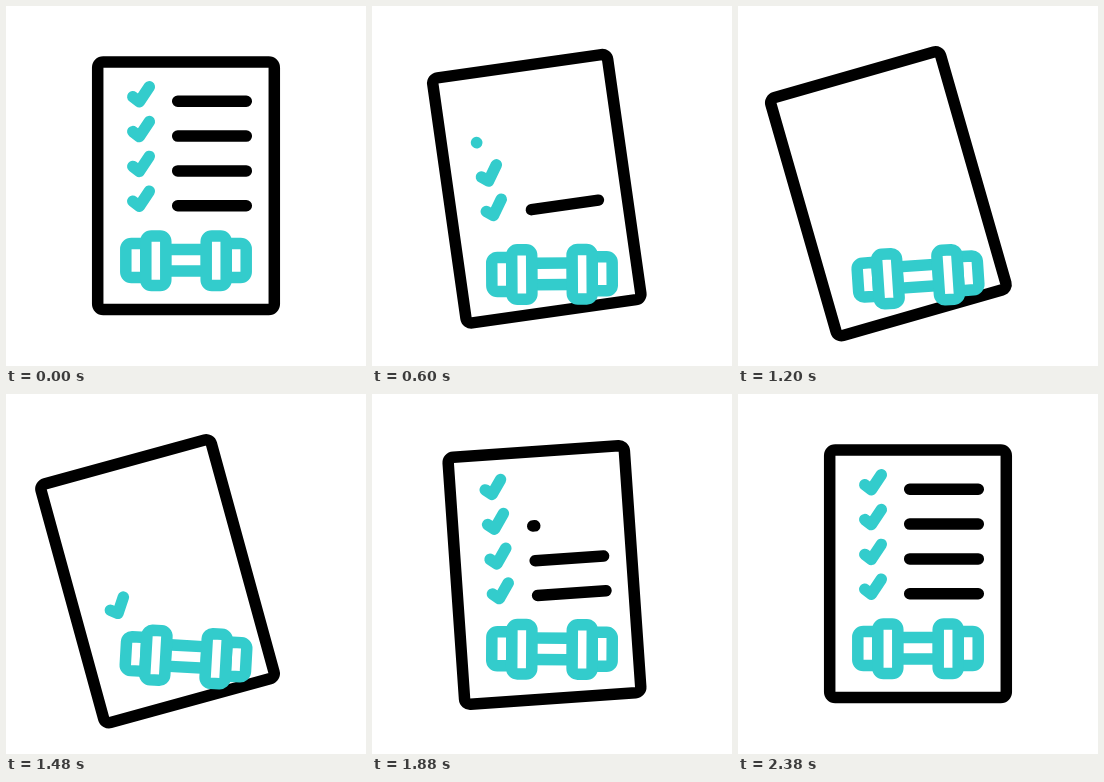
An HTML page for the animation above (2400 ms loop, 360 px wide and 360 px high).

```html
<!DOCTYPE html>
<html lang="en">
<head>
<meta charset="utf-8">
<title>Workout checklist</title>
<style>
  html, body { margin: 0; width: 100%; height: 100%; overflow: hidden; background: #fff; }
  svg { display: block; width: 100%; height: 100%; }
  g { fill: #fff; stroke-width: 11.5; stroke-linecap: round; stroke-linejoin: round; }
  #paper { stroke: #000; }
  #paper path { fill: none; }
  .check, #dumbbell { stroke: #3cc; }
</style>
</head>
<body>
<svg viewBox="0 0 360 360">
  <g id="paper"><rect x="91.7" y="56" width="176.6" height="247.5" rx="5.5"/></g>
  <g id="dumbbell">
    <rect x="119.8" y="237.5" width="20" height="34" rx="5.5"/>
    <rect x="220.2" y="237.5" width="20" height="34" rx="5.5"/>
    <rect x="159.5" y="243.5" width="41" height="21.5"/>
    <rect x="139.8" y="230" width="20" height="49.5" rx="5.5"/>
    <rect x="200.2" y="230" width="20" height="49.5" rx="5.5"/>
  </g>
</svg>
<script>
const LOOP = 2400, STEP = 400 / 3;
const paper = document.getElementById('paper');
const dumbbell = document.getElementById('dumbbell');

// cubic-bezier(.8, 0, .2, 1)
function ease(x) {
  if (x <= 0) return 0;
  if (x >= 1) return 1;
  let lo = 0, hi = 1;
  for (let i = 0; i < 24; i++) {
    const s = (lo + hi) / 2, r = 1 - s;
    if (2.4 * r * r * s + 0.6 * r * s * s + s ** 3 < x) lo = s; else hi = s;
  }
  return lo * lo * (3 - 2 * lo);
}

// Marks are erased top to bottom, then drawn again bottom to top
const marks = [];
function addMark(d, className, eraseAt, drawAt) {
  const path = document.createElementNS('http://www.w3.org/2000/svg', 'path');
  path.setAttribute('d', d);
  path.setAttribute('class', className);
  path.setAttribute('pathLength', 1);
  paper.append(path);
  marks.push({ path, eraseAt, drawAt });
}
for (let row = 0; row < 4; row++) {
  const y = 95.3 + row * 34.8, out = row * STEP, back = (3 - row) * STEP;
  addMark(`M171.7 ${y}H240.3`, 'line', 182 + out, 1587 + back);
  addMark(`M126.8 ${y - 4.5}l6.5 5 10-15`, 'check', 353 + out, 1377 + back);
}

// Dumbbell bounce: one [drop, angle] pose every 400 ms
const poses = [[0, 0], [29.5, -17], [-1.5, 15.5], [16, -3.8], [7.6, 3.8], [0, 0], [0, 0]];

function draw(t) {
  const tilt = 16 * (ease(t / 1200) - ease(t / 1200 - 1));
  paper.setAttribute('transform', `rotate(${-tilt} 193.6 289)`);

  for (const { path, eraseAt, drawAt } of marks) {
    const shown = 1 - ease((t - eraseAt) / STEP) + ease((t - drawAt) / STEP);
    path.style.display = shown > 0.002 ? '' : 'none';
    path.setAttribute('stroke-dasharray', shown < 1 ? `${shown} 2` : 'none');
  }

  const i = Math.floor(t / 400), k = ease(t / 400 - i);
  const [drop, angle] = poses[i].map((v, j) => v + (poses[i + 1][j] - v) * k);
  dumbbell.setAttribute('transform', `translate(0 ${drop}) rotate(${angle} 180 254.6)`);
}

const start = performance.now();
function frame() {
  draw((performance.now() - start) % LOOP);
  requestAnimationFrame(frame);
}
frame();
</script>
</body>
</html>
```
